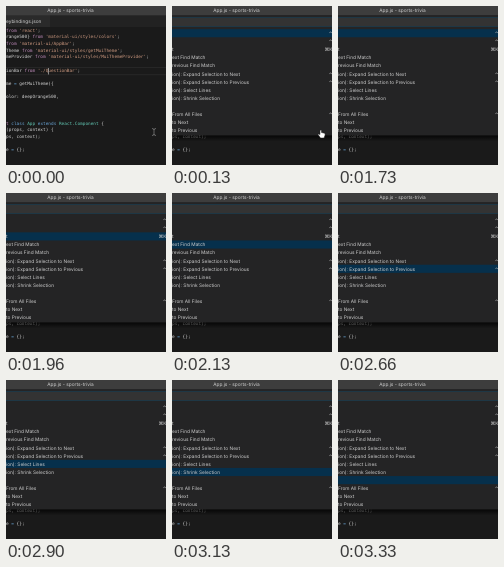
An HTML page for the animation above (3730 ms loop, 160 by 159 pixels).

```html
<!DOCTYPE html>
<html>
<head>
<meta charset="utf-8">
<style>
  html, body { margin: 0; height: 100%; overflow: hidden; background: #1a1a1a; }
  svg { display: block; width: 160px; height: 159px; text-rendering: geometricPrecision; }
  .code { font: 4.4px "DejaVu Sans Mono", monospace; fill: #d4d4d4; white-space: pre; }
  .ui { font: 4.79px Inter, sans-serif; fill: #d0d0d0; }
  .key { text-anchor: end; }
  .k { fill: #c58fc0; } .s { fill: #ce9a80; } .b { fill: #6aa6d8; } .t { fill: #62c8b4; }
</style>
</head>
<body>
<svg viewBox="0 0 160 159">
  <defs>
    <linearGradient id="shade" x2="0" y2="1">
      <stop stop-opacity=".75"/><stop offset="1" stop-opacity="0"/>
    </linearGradient>
  </defs>
  <rect width="160" height="159" fill="#1a1a1a"/>
  <rect y="9" width="160" height="12" fill="#222"/>
  <rect y="9" width="44" height="12" fill="#2a2a2a"/>
  <text class="ui" x="0" y="17">eybindings.json</text>
  <path d="M0 61.500H160M0 68.700H160" stroke="#303030" stroke-width=".6"/>
  <g id="code" class="code"></g>
  <rect id="caret" x="42" y="62" width=".7" height="6.500" fill="#bbb"/>
  <rect width="160" height="9.300" fill="#3d3d3d"/>
  <text class="ui" x="64.500" y="6.200" text-anchor="middle">App.js - sports-trivia</text>
  <g id="palette">
    <rect y="9.300" width="160" height="120.200" fill="#242425"/>
    <rect x="-1" y="11.500" width="162" height="9" fill="#333" stroke="#124560" stroke-width=".5"/>
    <rect id="bar" width="160" height="8.100" fill="#06304c"/>
    <g id="items" class="ui"></g>
    <rect y="129.500" width="160" height="6" fill="url(#shade)"/>
  </g>
  <path id="beam" d="M146 122.500q2 0 2 1.500v4q0 1.500-2 1.500M150 122.500q-2 0-2 1.500M148 128q0 1.500 2 1.500" fill="none" stroke="#888" stroke-width=".7"/>
  <path id="hand" d="M148 124.500q1-1 1.500 0v2l3 .7q1 .5.5 2l-1 2.800h-3.500l-2.500-3.500q.5-1 2 0z" fill="#fff" stroke="#222" stroke-width=".5"/>
</svg>
<script>
const $ = id => document.getElementById(id);
const LOOP = 3730, ROW = 8.1, FIRST = 27.2;

// [line index, markup]
const lines = [
  [0, "<k>from</k> <s>'react'</s>;"],
  [1, "range500} <k>from</k> <s>'material-ui/styles/colors'</s>;"],
  [2, " <k>from</k> <s>'material-ui/AppBar'</s>;"],
  [3, "Theme <k>from</k> <s>'material-ui/styles/getMuiTheme'</s>;"],
  [4, "meProvider <k>from</k> <s>'material-ui/styles/MuiThemeProvider'</s>;"],
  [6, "ionBar <k>from</k> <s>'./QuestionBar'</s>;"],
  [8, "me <b>=</b> getMuiTheme({"],
  [10, "olor: deepOrange500,"],
  [14, "<k>t</k> <b>class</b> <t>App</t> <b>extends</b> <t>React.Component</t> {"],
  [15, "(props, context) {"],
  [16, "ps, context);"],
  [18, "e <b>=</b> {};"]
];
const markup = s => s.replace(/<(\w)>/g, '<tspan class="$1">').replace(/<\/\w>/g, "</tspan>");
$("code").innerHTML = lines.map(([n, s]) =>
  `<text x="0" y="${25.7 + n * 6.65}">${markup(s)}</text>`).join("");

// [label, shortcut] for each palette row
const items = [
  ["", "⌃"], ["", "⌃"], ["t", "⌘K"], ["ext Find Match", ""], ["revious Find Match", ""],
  ["ion): Expand Selection to Next", "⌃"], ["ion): Expand Selection to Previous", "⌃"],
  ["ion): Select Lines", ""], ["ion): Shrink Selection", ""], ["", ""],
  ["From All Files", "⌃"], ["to Next", ""], ["to Previous", ""]
];
$("items").innerHTML = items.map(([label, key], i) => {
  const y = FIRST + i * ROW + 1.8;
  return `<text x="0" y="${y}">${label}</text><text class="key" x="160.5" y="${y}">${key}</text>`;
}).join("");

// moments when the selection steps down one row
const steps = [1800, 1960, 2130, 2260, 2460, 2660, 2900, 3130, 3330];
const show = (id, on) => $(id).setAttribute("visibility", on ? "visible" : "hidden");

function draw(now) {
  const t = now % LOOP;
  const row = steps.filter(s => t >= s).length;
  show("palette", t >= 100);
  show("caret", t < 100);
  show("beam", t < 130);
  show("hand", t >= 130 && t < 1730);
  $("bar").setAttribute("y", FIRST + row * ROW - ROW / 2);
  requestAnimationFrame(draw);
}
draw(performance.now());
</script>
</body>
</html>
```
